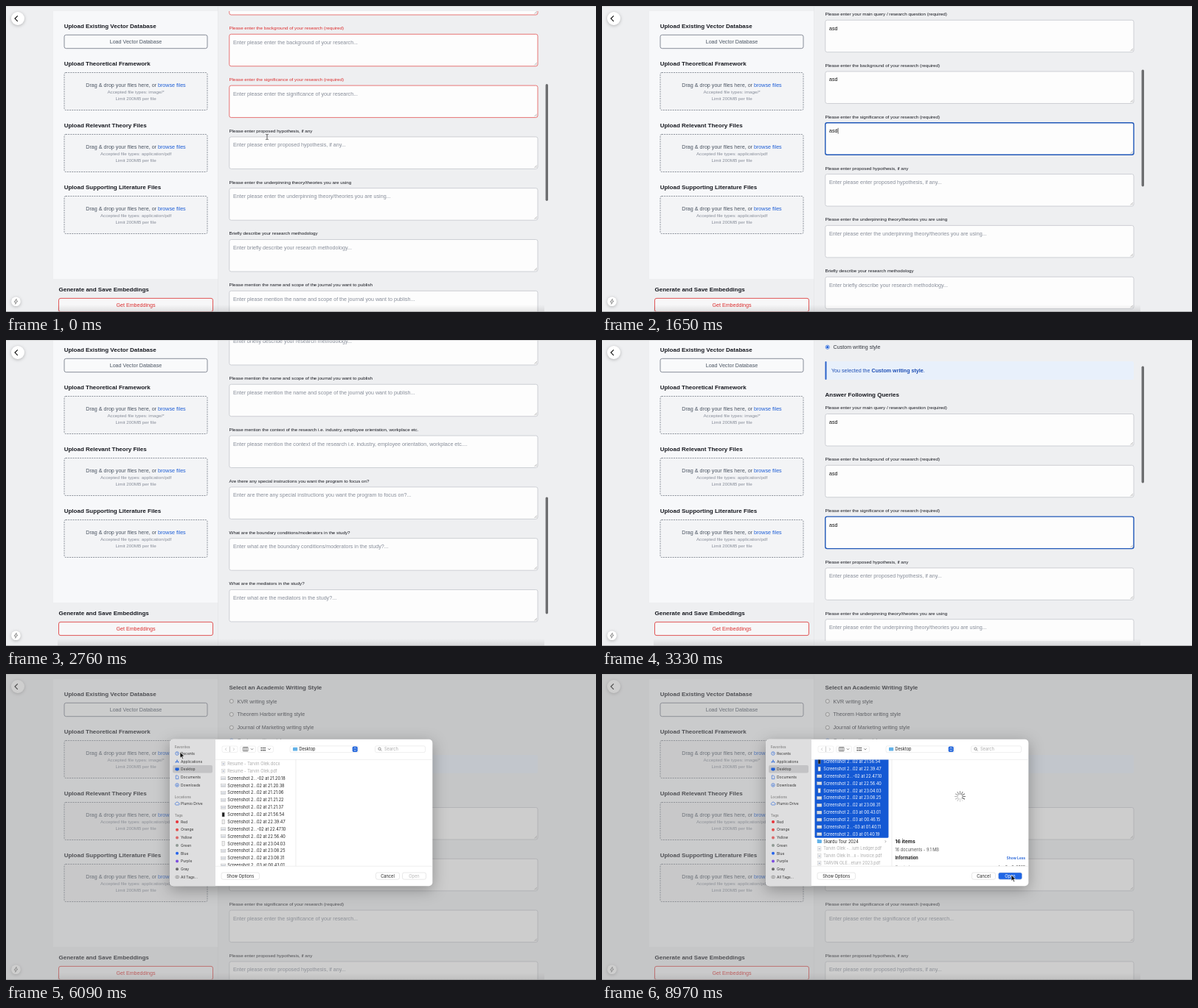
These frames come from a looping animation (800x416 px, 9000 ms). An HTML page:

```html
<!DOCTYPE html>
<html lang="en">
<head>
<meta charset="utf-8">
<title>Research form</title>
<style>
  html, body { margin: 0; width: 100%; height: 100%; overflow: hidden; background: #eeeff1; }
  svg { display: block; width: 800px; height: 416px; font-family: "Liberation Sans", Arial, sans-serif; }
  text { white-space: pre; }
  #dialog { font-family: Inter, Roboto, sans-serif; }
  #sheet { filter: drop-shadow(0 5px 10px rgba(0,0,0,.3)); }
</style>
</head>
<body>
<svg id="stage" viewBox="0 0 800 416"></svg>
<script>
const LOOP = 9000;
const INK = '#16181f', GREY = '#4b5563', PALE = '#878d99', BLUE = '#1f5fd6', RED = '#dc2f2f';
const FIELD_TOP = 187.5, FIELD_STEP = 69.8, FIELD_H = 43.5;
const ROW_TOP = 141.8, ROW_STEP = 9.86;

const stage = document.getElementById('stage');
const $ = id => document.getElementById(id);
const set = (el, attrs) => { for (const k in attrs) el.setAttribute(k, attrs[k]); };
const show = (el, on) => set(el, { opacity: +on });

// Markup helpers; text is placed by its vertical centre.
const txt = (x, yc, s, size, fill = INK, extra = '') =>
  `<text x="${x}" y="${(yc + size * .35).toFixed(2)}" font-size="${size}" fill="${fill}" ${extra}>${s}</text>`;
const rect = (x, y, w, h, fill, extra = '') =>
  `<rect x="${x}" y="${y}" width="${w}" height="${h}" fill="${fill}" ${extra}/>`;
const path = (d, stroke, width = .7, extra = '') =>
  `<path d="${d}" fill="none" stroke="${stroke}" stroke-width="${width}" ${extra}/>`;
const BOLD = 'font-weight="700"', MID = 'text-anchor="middle"', END = 'text-anchor="end"';

// Timing helpers.
const clamp = v => Math.max(0, Math.min(1, v));
const ease = p => p * p * (3 - 2 * p);
const ramp = (t, a, b) => clamp((t - a) / (b - a));
const step = (t, keys) => keys.reduce((v, k) => t >= k[0] ? k[1] : v, keys[0][1]);
function glide(t, keys) {
  if (t <= keys[0][0]) return keys[0].slice(1);
  for (let i = 1; i < keys.length; i++) {
    const a = keys[i - 1], b = keys[i];
    if (t <= b[0]) {
      const p = ease(ramp(t, a[0], b[0]));
      return a.slice(1).map((v, j) => v + (b[j + 1] - v) * p);
    }
  }
  return keys[keys.length - 1].slice(1);
}

const questions = [
  'Please enter your main query / research question (required)',
  'Please enter the background of your research (required)',
  'Please enter the significance of your research (required)',
  'Please enter proposed hypothesis, if any',
  'Please enter the underpinning theory/theories you are using',
  'Briefly describe your research methodology',
  'Please mention the name and scope of the journal you want to publish',
  'Please mention the context of the research i.e. industry, employee orientation, workplace etc.',
  'Are there any special instructions you want the program to focus on?',
  'What are the boundary conditions/moderators in the study?',
  'What are the mediators in the study?'
];
const typing = [[540, 4470], [930, 4170], [1380, 3840]];
const focusKeys = [[0, -1], [450, 0], [840, 1], [1260, 2], [4080, 1], [4380, 0], [5640, -1]];
const innerKeys = [[0, 213], [60, 213], [360, 151], [1590, 151], [2130, 470.5], [2220, 470.5], [2430, 530],
  [2730, 530], [3300, 67], [3360, 67], [3570, 0]];
const outerKeys = [[0, 6], [2430, 6], [2640, 20], [4680, 20], [4890, 0], [5340, 0], [5490, 6]];
const pointerKeys = [[0, 354, 178], [150, 354, 178], [420, 352, 52], [660, 352, 52], [820, 352, 122],
  [1110, 352, 122], [1240, 352, 192], [3860, 380, 328], [4060, 380, 258], [4200, 380, 258], [4370, 380, 188],
  [4660, 380, 188], [4950, 239, 118], [5340, 239, 118], [5490, 237, 110], [6270, 237, 110], [6840, 331, 147],
  [7230, 331, 147], [7620, 340, 219], [8160, 340, 219], [8700, 556, 277]];
const pointerKinds = [[0, 'beam'], [540, ''], [690, 'beam'], [930, ''], [1140, 'beam'], [1380, ''], [3870, 'beam'],
  [4150, ''], [4230, 'beam'], [4450, ''], [4680, 'arrow'], [4890, 'hand'], [5820, 'arrow']];

function leftColumn() {
  const drop = (i, title, type) => {
    const y = 84.5 + 84 * i;
    return txt(78.7, y, title, 8, INK, BOLD) +
      rect(79, y + 12, 194, 51, '#f3f4f6', `id="drop${i}" rx="2" stroke="#737a86" stroke-width=".8" stroke-dasharray="2 1.2"`) +
      txt(176, y + 28.5, `Drag &amp; drop your files here, or <tspan fill="${BLUE}">browse files</tspan>`, 7.15, GREY, MID) +
      txt(176, y + 38, 'Accepted file types: ' + type, 6.25, PALE, MID) +
      txt(176, y + 47, 'Limit 200MB per file', 6.25, PALE, MID);
  };
  return rect(64, 13, 223.5, 364, '#f7f8fa') + rect(287.3, 0, .7, 440, '#e4e6e9') +
    txt(78.7, 33.5, 'Upload Existing Vector Database', 8, INK, BOLD) +
    rect(79, 45.3, 194, 18.4, '#f9fafb', 'rx="2.5" stroke="#6b7280" stroke-width=".8"') +
    txt(176, 54.5, 'Load Vector Database', 7.15, GREY, MID) +
    drop(0, 'Upload Theoretical Framework', 'image/*') +
    drop(1, 'Upload Relevant Theory Files', 'application/pdf') +
    drop(2, 'Upload Supporting Literature Files', 'application/pdf') +
    txt(71.5, 391.5, 'Generate and Save Embeddings', 8, INK, BOLD) +
    rect(71.5, 403.4, 209, 18.2, '#f7f7f8', `rx="2.5" stroke="${RED}" stroke-width=".8"`) +
    txt(176, 412.5, 'Get Embeddings', 7.15, RED, MID);
}

function formColumn() {
  const styles = ['KVR', 'Theorem Harbor', 'Journal of Marketing', 'Custom'].map((s, i) => {
    const y = 43 + 17.9 * i, on = i === 3;
    return `<circle cx="305.8" cy="${y}" r="2.6" fill="#fff" stroke="${on ? BLUE : '#767676'}" stroke-width=".7"/>` +
      (on ? `<circle cx="305.8" cy="${y}" r="1.6" fill="${BLUE}"/>` : '') +
      txt(313.5, y, s + ' writing style', 7.15, '#30343c');
  }).join('');
  const fields = questions.map((q, i) => {
    const y = FIELD_TOP + FIELD_STEP * i, base = q.replace(' (required)', '');
    return txt(302.5, y - 8.2, q, 6.25, INK, `id="label${i}"`) +
      rect(302.8, y, 418.2, FIELD_H, '#fdfdfd', `id="box${i}" rx="2.5"`) +
      path(`M716.5 ${y + 42}l3.4-3.4M718.5 ${y + 42}l1.4-1.4`, '#777', .5) +
      txt(308, y + 11, `Enter ${base[0].toLowerCase()}${base.slice(1)}...`, 7.15, PALE, `id="hint${i}"`) +
      txt(308, y + 11, '', 7.15, '#111', `id="value${i}"`);
  }).join('');
  return txt(302.5, 24, 'Select an Academic Writing Style', 8, INK, BOLD) + styles +
    rect(302.5, 116, 418.5, 25, '#e8f0fb', 'rx="2"') + rect(302.5, 116, 2, 25, '#2b62c9', 'rx="1"') +
    txt(311, 128.5, `You selected the <tspan ${BOLD}>Custom writing style</tspan>.`, 7.15, '#1d4eb5') +
    txt(302.5, 161.5, 'Answer Following Queries', 8, INK, BOLD) + fields +
    rect(319.8, 0, .6, 8, '#111', 'id="caret"');
}

function sidebar() {
  const item = (y, s, icon) => icon + txt(237, y, s, 5, '#333');
  const places = ['Recents', 'Applications', 'Desktop', 'Documents', 'Downloads'];
  const tags = { Red: '#e8333a', Orange: '#e2504e', Yellow: '#d9686a', Green: '#8f9a94', Blue: '#2563eb', Purple: '#7c4de0', Gray: '#6b6b6b' };
  const head = (y, s) => txt(228.7, y, s, 4.7, '#8a8a8a', 'font-weight="600"');
  const shapes = [
    y => `<circle cx="232" cy="${y}" r="2.3" fill="none" stroke="${BLUE}" stroke-width=".6"/>` + path(`M232 ${y - 1.4}v1.4h1.2`, BLUE, .5),
    y => path(`M230 ${y + 2}l2-4 2 4M229.6 ${y + .8}h4.8`, BLUE),
    y => rect(229.4, y - 2, 5.2, 3.4, BLUE, 'rx=".5"') + rect(230.8, y + 1.9, 2.4, .6, BLUE),
    y => path(`M230.3 ${y - 2.3}h2.2l1.3 1.3v3.4h-3.5z`, BLUE, .6),
    y => `<circle cx="232" cy="${y}" r="2.3" fill="none" stroke="${BLUE}" stroke-width=".6"/>` + path(`M232 ${y - 1.3}v2.4m-1-1l1 1 1-1`, BLUE, .5)
  ];
  return rect(226, 124, 54, 10.6, '#c3c3c5', 'rx="2"') + head(99, 'Favorites') +
    places.map((p, i) => item(108 + 10.75 * i, p, shapes[i](108 + 10.75 * i))).join('') +
    head(167, 'Locations') +
    item(176, 'Plumio Drive', path('M230.3 178h3.6a1.3 1.3 0 0 0 0-2.6a1.8 1.8 0 0 0-3.4-.3a1.5 1.5 0 0 0-.2 2.9z', BLUE, .6)) +
    head(192, 'Tags') +
    Object.keys(tags).map((k, i) => item(201 + 10.7 * i, k, `<circle cx="232" cy="${201 + 10.7 * i}" r="2" fill="${tags[k]}"/>`)).join('') +
    item(276, 'All Tags…', '<circle cx="231.4" cy="276" r="1.8" fill="none" stroke="#777" stroke-width=".5"/><circle cx="233" cy="276" r="1.8" fill="none" stroke="#777" stroke-width=".5"/>');
}

const shots = '-02 at 21.20.18,02 at 21.20.38,02 at 21.21.06,02 at 21.21.22,02 at 21.21.37,02 at 21.56.54,02 at 22.39.47,-02 at 22.47.10,02 at 22.56.40,02 at 23.04.03,02 at 23.08.25,02 at 23.08.31,03 at 00.43.01,03 at 00.46.15,-03 at 01.40.11,03 at 01.40.19'.split(',');

function fileList() {
  const rowY = i => ROW_TOP + ROW_STEP * i;
  const page = y => rect(292.7, y - 2.7, 4.3, 5.4, '#f4f4f4', 'stroke="#bbb" stroke-width=".4"') + rect(293.7, y - .6, 2.2, 1.4, '#aab4c8');
  const faded = (i, s) => page(rowY(i)) + txt(300.3, rowY(i), s, 5.6, '#a9a9a9');
  const shot = (s, i) => {
    const y = rowY(i), tall = i === 5 || i === 6 || i === 9;
    return (tall ? rect(293, y - 2.9, 3.2, 5.8, i === 5 ? '#222' : '#eee', 'stroke="#999" stroke-width=".4"')
                 : rect(291.5, y - 2, 6.4, 4, '#e9ebee', 'stroke="#aaa" stroke-width=".4"') + rect(292, y, 5.4, .8, '#b9bec8')) +
      txt(300.3, y, 'Screenshot 2...' + s, 5.6, '#222', `id="shot${i}"`);
  };
  const y = rowY(16);
  return rect(288.5, rowY(0) - 4.9, 100, 1, '#1459d4', 'id="marked" rx="1.5"') +
    faded(-2, 'Resume - Tarvin Olek.docx') + faded(-1, 'Resume - Tarvin Olek.pdf') + shots.map(shot).join('') +
    rect(291.7, y - 2.3, 6.2, 4.7, '#62b2e8', 'rx=".7"') + rect(291.7, y - 2.9, 2.6, 1.2, '#62b2e8') +
    txt(300.3, y, 'Skardu Tour 2024', 5.6, '#222') + path(`M383.7 ${y - 1.5}l1.3 1.5-1.3 1.5`, '#777', .6) +
    faded(17, 'Tarvin Olek -...ium Ledger.pdf') + faded(18, 'Tarvin Olek In...x - Invoice.pdf') + faded(19, 'TARVIN OLE...eturn 2023.pdf');
}

function dialog() {
  const button = (x, w, s, id = '') => rect(x, 270, w, 9.2, '#fff', `rx="2.3" stroke="#d0d0d0" stroke-width=".5" ${id && `id="${id}Box"`}`) +
    txt(x + w / 2, 274.6, s, 5.65, '#222', `${MID} ${id && `id="${id}Text"`}`);
  const chevron = x => path(`M${x} 101.4l1.5 1.5 1.5-1.5`, '#555', .8);
  const spokes = Array.from({ length: 12 }, (_, i) =>
    `<path d="M0-3.3V-7" stroke="#444" stroke-width="1.2" stroke-linecap="round" opacity="${(.15 + i * .06).toFixed(2)}" transform="rotate(${i * 30})"/>`).join('');
  return `<g id="sheet">${rect(222, 88.7, 356.3, 199.6, '#fff', 'rx="5"')}</g>` +
    `<path d="M284 88.7H227a5 5 0 0 0-5 5v189.600a5 5 0 0 0 5 5h57z" fill="#dededf"/>` + sidebar() +
    path('M284 116.3h294.3M284 261.3h294.3M393 116.3v145', '#e2e2e2', .6) +
    rect(293, 98, 21, 8.5, '#fff', 'rx="2" stroke="#e0e0e0" stroke-width=".5"') +
    path('M299 100.4l-1.600 1.800 1.600 1.800M308 100.4l1.600 1.800-1.600 1.800M303.5 98.500v7.500', '#b5b5b5') +
    rect(317.500, 98, 21, 8.500, '#fff', 'rx="2" stroke="#e0e0e0" stroke-width=".5"') +
    path('M321.500 99.600h6.500v5.200h-6.500zM323.700 99.600v5.200M325.800 99.600v5.200', '#555') + chevron(332) +
    rect(341.500, 98, 21, 8.500, '#fff', 'rx="2" stroke="#e0e0e0" stroke-width=".5"') +
    path('M345.500 100.500h6.500M345.500 103.700h6.500', '#555', 1.700, 'stroke-dasharray="1.700 .7"') + chevron(355.500) +
    rect(385, 97.800, 93, 8.900, '#fff', 'rx="2.200" stroke="#ddd" stroke-width=".5"') +
    rect(389, 99.800, 6.200, 4.800, '#62b2e8', 'rx=".7"') + txt(397.500, 102.200, 'Desktop', 5.650, '#222') +
    rect(469.700, 98.500, 7, 7.400, '#2668dc', 'rx="1.700"') + path('M471.800 101.500l1.400-1.500 1.400 1.500M471.800 103l1.400 1.500 1.400-1.500', '#fff') +
    rect(500.500, 97.800, 68, 8.900, '#fff', 'rx="2.200" stroke="#ddd" stroke-width=".5"') +
    '<circle cx="506.500" cy="101.700" r="1.700" fill="none" stroke="#666" stroke-width=".7"/>' + path('M507.800 103l1.500 1.500', '#666') +
    txt(513, 102.300, 'Search', 5.650, '#aaa') +
    `<g clip-path="url(#listClip)"><g id="list">${fileList()}</g></g>` +
    `<g id="preview" clip-path="url(#listClip)"><g id="spinner">${spokes}</g>` +
    txt(397.500, 228, '16 items', 6.800, '#222', BOLD) + txt(397.500, 239.500, '16 documents - 9.1 MB', 5.600, '#555') +
    txt(397.500, 250.500, 'Information', 5.500, '#222', BOLD) + txt(574, 250.500, 'Show Less', 4.900, BLUE, `${END} font-weight="600"`) +
    txt(397.500, 262, 'Created', 5.200, '#888') + txt(574, 262, 'Jan 2 - 3, 2025', 5.200, '#333', END) + '</g>' +
    button(292, 51.500, 'Show Options') + button(501.500, 32, 'Cancel') + button(537.500, 32, 'Open', 'open');
}

stage.innerHTML =
  `<defs><clipPath id="paneClip">${rect(288, 13, 448, 416, '#000')}</clipPath>
   <clipPath id="listClip">${rect(284, 116.6, 294, 144.5, '#000')}</clipPath>
   <linearGradient id="shade" x2="0" y2="1"><stop offset="0" stop-color="#000" stop-opacity="0"/><stop offset="1" stop-color="#000" stop-opacity=".1"/></linearGradient></defs>` +
  rect(0, 0, 800, 416, '#eeeff1') +
  `<g id="page">${leftColumn()}<g clip-path="url(#paneClip)"><g id="form">${formColumn()}</g></g>` +
  rect(731.6, 0, 3.4, 159, '#6c6d6f', 'id="innerThumb" rx="1.7"') + '</g>' +
  rect(796, 0, 3.3, 397, '#737476', 'id="outerThumb" rx="1.7"') +
  rect(70, 406, 660, 10, 'url(#shade)') + rect(0, 0, 800, .7, '#cfd0d2') + rect(0, 415.2, 800, .8, '#9b9c9e') +
  '<g style="filter:drop-shadow(0 1px 2px rgba(0,0,0,.25))"><circle cx="16" cy="17" r="9" fill="#fff"/><circle cx="13.5" cy="401.7" r="6.3" fill="#fff"/></g>' +
  path('M15.8 13.4l-3.7 3.7 3.7 3.7', '#111', 1.2) +
  path('M14.2 398.2l-3.1 4.1h2l-.5 3 3.200-4.200h-2z', '#555', .6) +
  rect(0, 0, 800, 416, '#939393', 'id="dim"') + `<g id="dialog">${dialog()}</g>` +
  `<g id="beam">${path('M-1.8-3.600q1.800 0 1.800 1v5.200q0 1-1.800 1M1.800-3.600q-1.800 0-1.800 1M1.800 3.600q-1.800 0-1.800-1', '#222')}</g>
   <g id="arrow"><path d="M-1-4v8.300l1.900-1.700 1.300 2.900 1.300-.6-1.300-2.800h2.500z" fill="#111" stroke="#fff" stroke-width=".6"/></g>
   <g id="hand"><path d="M-1.500-3.500q.8-.8 1.500.2v2.300l2.800.7q1 .4.800 1.600l-.7 3h-3.800l-2.200-2.900q-.3-1 .7-.9l.9.8z" fill="#fff" stroke="#222" stroke-width=".7"/></g>`;

function drawFields(t) {
  const focus = step(t, focusKeys);
  questions.forEach((_, i) => {
    const [start, clear] = typing[i] || [Infinity, 0];
    const value = t >= start && t < clear ? 'asd'.slice(0, 1 + Math.floor((t - start) / 60)) : '';
    const wrong = i < 3 && t < start, focused = focus === i;
    set($('label' + i), { fill: wrong ? RED : INK });
    set($('box' + i), {
      stroke: focused ? '#1f57b8' : wrong ? '#e25555' : '#c3c6cc',
      'stroke-width': focused ? 1.4 : .8
    });
    show($('hint' + i), !value);
    $('value' + i).textContent = value;
  });
  set($('caret'), { y: FIELD_TOP + FIELD_STEP * focus + 7 });
  show($('caret'), (t >= 660 && t < 800) || (t >= 1050 && t < 1240) || (t >= 1500 && t < 1700));
}

function drawDialog(t) {
  const open = ramp(t, 5730, 5850), ready = t >= 8130;
  set($('dim'), { opacity: .45 * open });
  set($('dialog'), { opacity: open });
  const [scroll] = glide(t, [[0, 0], [7590, 0], [8040, 71.9]]);
  const [, pointerY] = glide(t, pointerKeys);
  const count = t < 7200 ? 0 : t >= 8040 ? 16 : Math.min(16, Math.max(1, Math.round((pointerY - 4 + scroll - ROW_TOP) / ROW_STEP) + 1));
  set($('list'), { transform: `translate(0 ${-scroll})` });
  set($('marked'), { height: ROW_STEP * count });
  shots.forEach((_, i) => set($('shot' + i), { fill: i < count ? '#fff' : '#222' }));
  show($('preview'), ready);
  set($('spinner'), { transform: `translate(485.5 166.5) rotate(${Math.floor(t / 60) * 30})` });
  set($('openBox'), { fill: ready ? '#1f66e5' : '#fff' });
  set($('openText'), { fill: ready ? '#fff' : '#b8b8b8' });
}

function render(t) {
  const [inner] = glide(t, innerKeys), [outer] = glide(t, outerKeys);
  set($('page'), { transform: `translate(0 ${-outer})` });
  set($('form'), { transform: `translate(0 ${-inner})` });
  set($('innerThumb'), { y: 29.5 + inner * .3876, opacity: 1 - ramp(t, 3630, 3750) });
  set($('outerThumb'), {
    y: 1.5 + outer * .85,
    opacity: t < 3000 ? ramp(t, 2430, 2490) - ramp(t, 2670, 2760) : ramp(t, 4680, 4740) - ramp(t, 5520, 5640)
  });
  const hover = t >= 4890 && t < 5730;
  set($('drop0'), { stroke: hover ? BLUE : '#737a86' });
  drawFields(t);
  drawDialog(t);
  const kind = step(t, pointerKinds), [x, y] = glide(t, pointerKeys);
  for (const name of ['beam', 'arrow', 'hand']) {
    show($(name), name === kind);
    set($(name), { transform: `translate(${x} ${y})` });
  }
}

const began = performance.now();
function tick() {
  render((performance.now() - began) % LOOP);
  requestAnimationFrame(tick);
}
render(0);
requestAnimationFrame(tick);
</script>
</body>
</html>
```
